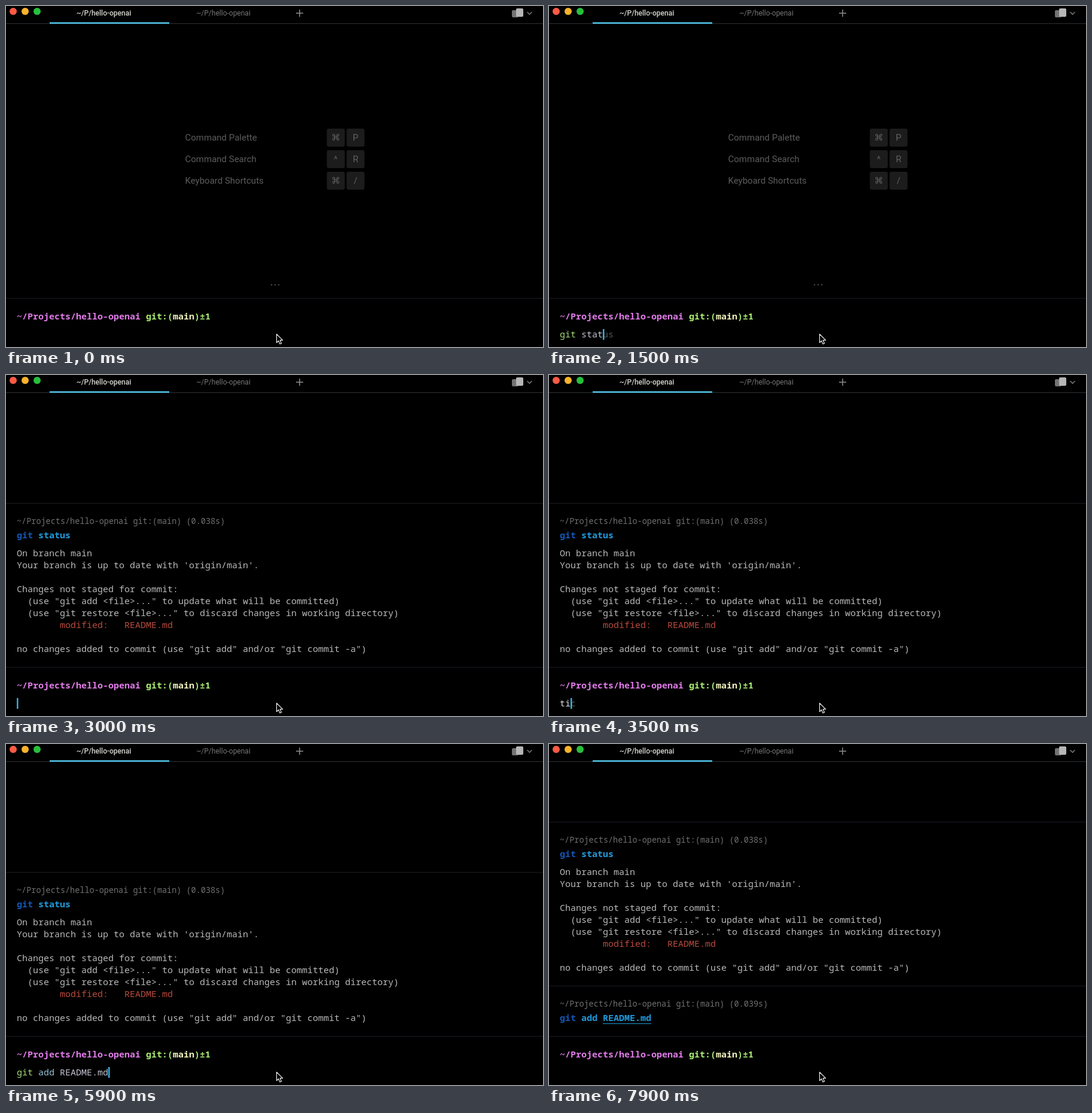
An HTML page for the animation above (8000 ms loop, 898 by 570 pixels).

```html
<!DOCTYPE html>
<html lang="en">
<head>
<meta charset="utf-8">
<title>Terminal</title>
<style>
html, body { margin: 0; width: 100%; height: 100%; overflow: hidden; background: #000; }
svg { display: block; width: 898px; height: 570px; }
text { white-space: pre; }
.mono { font: 15px "Noto Sans Mono", "DejaVu Sans Mono", monospace; fill: #b9b9b9; }
.head { font-size: 13.5px; fill: #707070; }
.bold { font-weight: 700; }
.semi { font-weight: 600; }
.ui { font: 15px Roboto, sans-serif; fill: #5c5c5c; }
.tab { font: 12px Roboto, sans-serif; fill: #767676; text-anchor: middle; }
.active { font-weight: 500; fill: #d6d6d0; }
.key { font: 15px Roboto, "DejaVu Sans", sans-serif; fill: #606060; text-anchor: middle; }
.rule { stroke: #1a1a24; }
</style>
</head>
<body>
<svg viewBox="0 0 898 570">
  <rect width="898" height="570"/>
  <path class="rule" d="M0 29.5H898" style="stroke:#2c3236"/>
  <rect x="73" y="27" width="200" height="3" fill="#48abc9"/>
  <circle cx="12" cy="9" r="6" fill="#fc5b45"/>
  <circle cx="32" cy="9" r="6" fill="#fbb32c"/>
  <circle cx="52" cy="9" r="6" fill="#28bf3c"/>
  <text id="title" class="tab active" x="163.5" y="16"></text>
  <text class="tab" x="363.5" y="16">~/P/hello-openai</text>
  <path d="M485 12H497M491 6V18" stroke="#8e8e8e" stroke-width="1.5"/>
  <rect x="846" y="7" width="11" height="12" rx="2" fill="#737373"/>
  <rect x="853" y="4" width="12" height="14" rx="2" fill="#b6b6b6"/>
  <path d="M871.5 10L875.5 14L879.5 10" fill="none" stroke="#747474" stroke-width="1.6"/>

  <g id="welcome"></g>
  <g id="status"></g>
  <g id="add"></g>

  <path class="rule" d="M0 488.5H898"/>
  <text class="mono semi" x="18" y="524"><tspan fill="#e27bea">~/Projects/hello-openai</tspan><tspan fill="#a9ee72"> git:(</tspan><tspan fill="#f2f2bd">main</tspan><tspan fill="#a9ee72">)±1</tspan></text>
  <text id="input" class="mono" x="18" y="554"></text>
  <rect id="caret" y="540" width="2.5" height="18" fill="#38aede"/>
  <path d="M452.5 548.5V562.7L455.7 559.7L458 565L460.6 563.9L458.3 558.7H462.7Z" fill="#000" stroke="#ececec" stroke-width="1.2" stroke-linejoin="round"/>
</svg>
<script>
const $ = id => document.getElementById(id);
const esc = s => s.replace(/&/g, "&amp;").replace(/</g, "&lt;");
const span = (s, fill) => `<tspan fill="${fill}">${esc(s)}</tspan>`;
const line = (s, y, cls = "", fill = "") =>
  `<text class="mono ${cls}" x="18" y="${y}"${fill && ` style="fill:${fill}"`}>${s}</text>`;
const PATH = "~/P/hello-openai";
const BLUE = "#1457b4", CYAN = "#209adc", GREEN = "#a5dc78", PALE = "#c2c2d2", DIM = "#565656";

const shortcuts = [["Command Palette", "⌘", "P"], ["Command Search", "^", "R"], ["Keyboard Shortcuts", "⌘", "/"]];
$("welcome").innerHTML = shortcuts.map(([label, ...keys], i) => {
  const y = 220 + 36 * i;
  return `<text class="ui" x="299.5" y="${y + 5}">${label}</text>` + keys.map((k, j) => {
    const x = 551.5 + 33 * j;
    return `<rect x="${x - 15}" y="${y - 15}" width="30" height="30" rx="3" fill="#1c1c1c"/>` +
      `<text class="key" x="${x}" y="${y + 5}">${k}</text>`;
  }).join("");
}).join("") + [444, 450, 456].map(x => `<circle cx="${x}" cy="466" r="1.2" fill="#484848"/>`).join("");

// Finished command: rule, prompt with duration, command line
const block = (top, secs, cmd) =>
  `<path class="rule" d="M0 ${top + 0.5}H898"/>` +
  line(`~/Projects/hello-openai git:(main) (${secs}s)`, top + 35, "head") +
  line(span("git ", BLUE) + span(cmd, CYAN), top + 59, "bold");

const output = [
  "On branch main",
  "Your branch is up to date with 'origin/main'.",
  "",
  "Changes not staged for commit:",
  '  (use "git add <file>..." to update what will be committed)',
  '  (use "git restore <file>..." to discard changes in working directory)',
  "        modified:   README.md",
  "",
  'no changes added to commit (use "git add" and/or "git commit -a")'
];
$("status").innerHTML = block(214, "0.038", "status") +
  output.map((s, i) => line(esc(s), 303 + 20 * i, "", i === 6 ? "#b84a3c" : "")).join("");
$("add").innerHTML = block(404, "0.039", "add README.md") +
  `<path d="M90 467.5H171" stroke="${CYAN}"/>`;

const typed = (s, t, start, step) =>
  s.slice(0, Math.max(0, Math.floor((t - start) / step) + 1));

function command(t) {
  if (t < 2000) return typed("git status", t, 1050, 64);
  if (t < 3400) return "";
  if (t < 4200) return t < 3500 || t >= 4100 ? "t" : "ti";
  if (t < 6000) return typed("git add README.md", t, 4600, 70);
  return "";
}

function suggestion(cmd) {
  const full = cmd[0] === "t" ? "tic" : "git status";
  return cmd && full.startsWith(cmd) ? full.slice(cmd.length) : "";
}

function colour(cmd) {
  if (cmd.length < 4) return span(cmd, "#dedede");
  const sub = cmd.slice(3, 7);
  return span(cmd.slice(0, 3), GREEN) + span(sub, sub === " add" ? "#98bfd6" : PALE) + span(cmd.slice(7), PALE);
}

function caretOn(t) {
  if (t < 2000) return t >= 600;
  if (t >= 3400 && t < 6000) return t < 4500 || t >= 4600;
  return t % 1000 < 500;
}

function draw(t) {
  const cmd = command(t);
  const running = t >= 2000 && t < 2400 ? "git status " : t >= 6000 && t < 6300 ? "git add README.md " : "";
  $("title").textContent = running + PATH;
  $("welcome").style.display = t < 2000 ? "" : "none";
  $("status").style.display = t < 2000 ? "none" : "";
  $("status").setAttribute("transform", `translate(0 ${t < 6000 ? 0 : -84})`);
  $("add").style.display = t < 6000 ? "none" : "";
  $("input").innerHTML = colour(cmd) + span(suggestion(cmd), DIM);
  $("caret").setAttribute("x", 18 + 9 * cmd.length);
  $("caret").style.display = caretOn(t) ? "" : "none";
}

function tick() {
  draw(Math.floor(performance.now() % 8000 / 100) * 100);
  requestAnimationFrame(tick);
}
tick();
</script>
</body>
</html>
```
